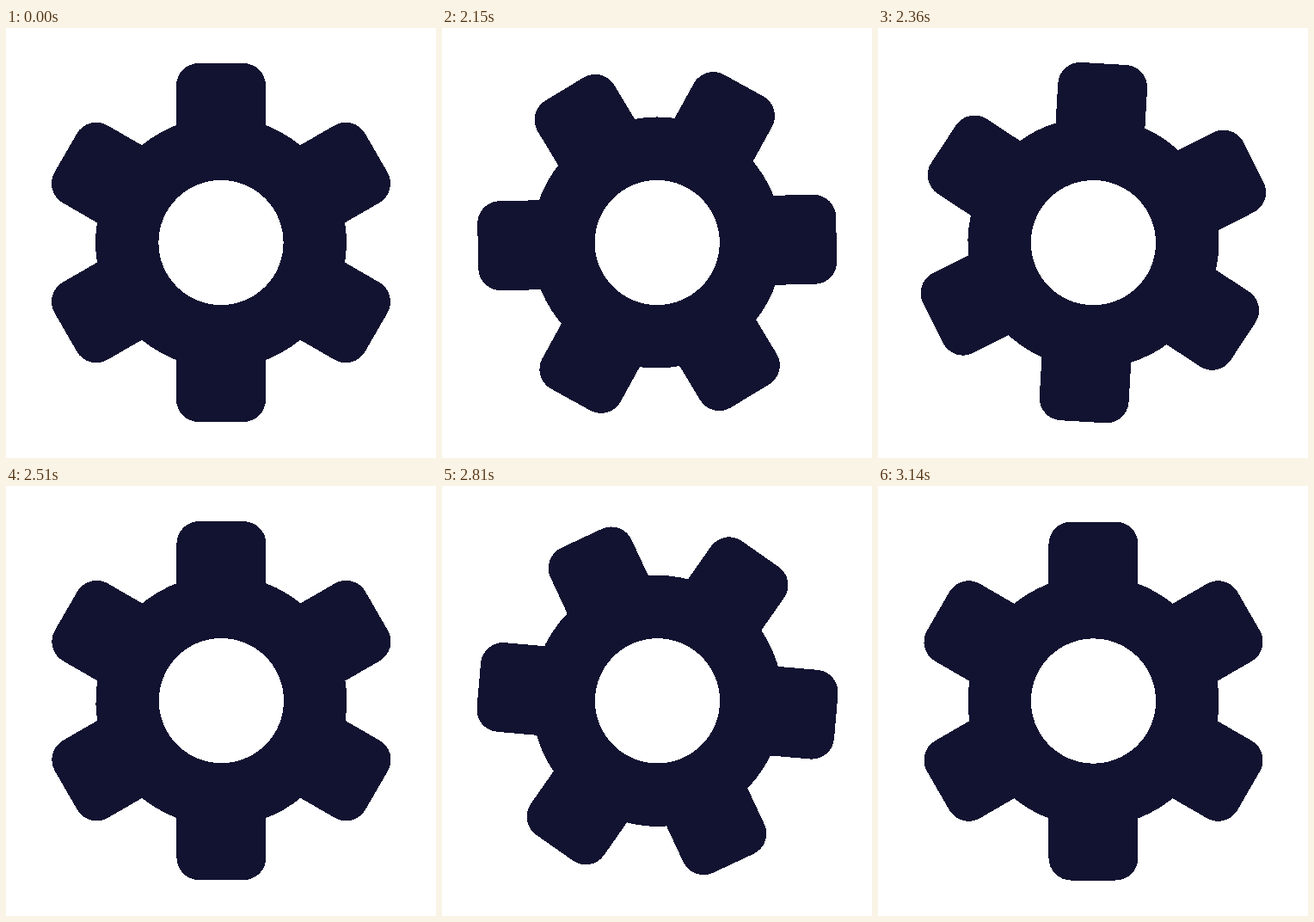
Recreate the animation shown at these times as an HTML page. Size 500 by 500 pixels, loop 3260 ms.

```html
<!DOCTYPE html>
<html lang="en">
<head>
<meta charset="utf-8">
<title>Gear</title>
<style>
  html, body { margin: 0; width: 100%; height: 100%; overflow: hidden; background: #fff; }
  svg { display: block; width: 100vw; height: 100vh; }
</style>
</head>
<body>
<svg viewBox="0 0 500 500" fill="#121331" shape-rendering="crispEdges">
  <defs>
    <rect id="bar" x="-52" y="-208.5" width="104" height="417" rx="26"/>
  </defs>
  <g id="gear">
    <use href="#bar"/>
    <use href="#bar" transform="rotate(60)"/>
    <use href="#bar" transform="rotate(120)"/>
    <circle r="146"/>
    <circle r="72.6" fill="#fff"/>
  </g>
</svg>
<script>
const LOOP = 3260, STEP = 30, STEPS = 17, TURN = 60;
const gear = document.getElementById('gear');

const bezier = (p1, p2, u) =>
  3 * p1 * u * (1 - u) ** 2 + 3 * p2 * u * u * (1 - u) + u ** 3;

// Ease in, overshoot, settle.
function ease(x) {
  if (x <= 0) return 0;
  if (x >= 1) return 1;
  let lo = 0, hi = 1;
  for (let i = 0; i < 30; i++) {
    const mid = (lo + hi) / 2;
    if (bezier(0.254, 0.398, mid) < x) lo = mid; else hi = mid;
  }
  return bezier(0, 1.4, lo);
}

// One notch of the gear, advanced in fixed time steps.
function notch(time, start, lag) {
  const step = Math.floor((time - start) / STEP) + 1;
  return TURN * ease((step - lag) / (STEPS - lag));
}

function draw(now) {
  const time = now % LOOP;
  const angle = notch(time, 2030, 0) + notch(time, 2660, 0.37);
  // The gear sits slightly off its pivot.
  gear.setAttribute('transform',
    `translate(250.1 249.9) rotate(${angle}) translate(-.1 -.4)`);
}

const begin = performance.now();
function frame() {
  draw(performance.now() - begin);
  requestAnimationFrame(frame);
}
frame();
</script>
</body>
</html>
```
